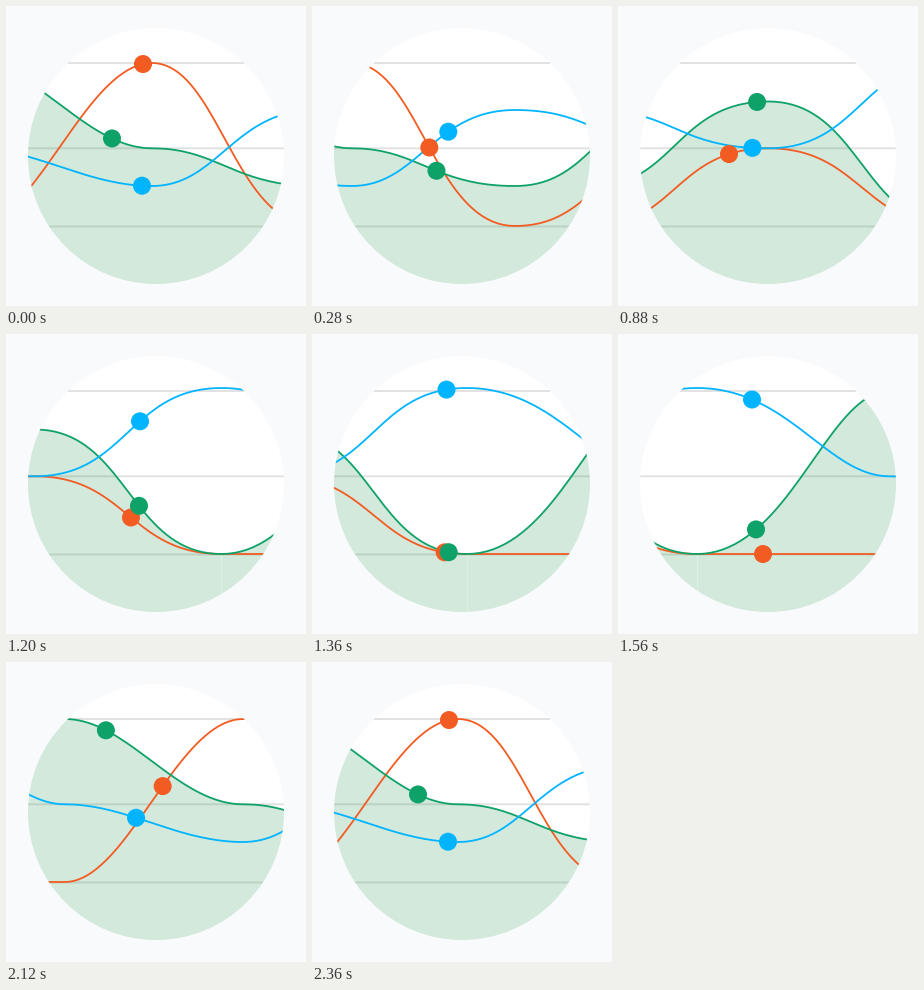
Write a matplotlib script that moves like this. It is 300 by 300 pixels and loops after 2.4 s.

```python
import numpy as np
import matplotlib.pyplot as plt
from matplotlib.animation import FuncAnimation
from matplotlib.patches import Circle

SIZE, DPI = 300, 100
FRAMES, INTERVAL = 60, 40
LAST = FRAMES - 1
PERIOD = 895
MID = 150
PX = 72 / DPI

ORANGE, GREEN, BLUE = "#f25c22", "#0fa268", "#00b4ff"
TOP, MIDDLE, LOW = 57, 142.3, 220

# Shared knots: place along the strip and length of the flat bezier handles
KNOTS = np.array([-4, 159, 334, 520.5, 713])
REACH = np.array([66, 81, 92, 92, 62])
SEAM = 3

LEVELS = {
    ORANGE: [TOP, LOW, MIDDLE, LOW, LOW],
    GREEN: [MIDDLE, 180, 95.5, LOW, TOP],
    BLUE: [180, 104, MIDDLE, 54, MIDDLE],
}

# The dots drift sideways between these beats while riding their curves
BEATS = np.array([0, 14, 30, 39, 47])
DRIFT = {
    ORANGE: [137, 105, 125, 145, 170],
    GREEN: [106, 141, 133, 138, 103],
    BLUE: [136, 135, 134, 134, 125],
}


def loop(values, span=0):
    """Repeat a periodic series once before and once after itself."""
    values = np.asarray(values)
    return np.concatenate([values - span, values, values + span])


def build_curve(levels):
    t = np.linspace(0, 1, 40, endpoint=False)[:, None]
    x0, x1 = KNOTS, np.append(KNOTS[1:], KNOTS[0] + PERIOD)
    y0, y1 = np.array(levels), np.roll(levels, -1)
    c0, c1 = x0 + REACH, x1 - np.roll(REACH, -1)
    s = 1 - t
    x = s**3 * x0 + 3 * s**2 * t * c0 + 3 * s * t**2 * c1 + t**3 * x1
    y = y0 + (y1 - y0) * t**2 * (3 - 2 * t)
    return loop(x.T.ravel(), PERIOD), loop(y.T.ravel())


def drift(color, i):
    """Smooth periodic path through the beats (Catmull-Rom)."""
    beats, xs = loop(BEATS, LAST), loop(DRIFT[color])
    k = np.searchsorted(beats, i, side="right") - 1
    width = beats[k + 1] - beats[k]
    p = (i - beats[k]) / width
    m0, m1 = [width * (xs[j + 1] - xs[j - 1]) / (beats[j + 1] - beats[j - 1])
              for j in (k, k + 1)]
    blend = p * p * (3 - 2 * p)
    return (xs[k] + (xs[k + 1] - xs[k]) * blend
            + m0 * p * (1 - p)**2 - m1 * p * p * (1 - p))


curves = {color: build_curve(levels) for color, levels in LEVELS.items()}

fig = plt.figure(figsize=(SIZE / DPI, SIZE / DPI), dpi=DPI, facecolor="#f8fafc")
ax = fig.add_axes([0, 0, 1, 1])
ax.set_xlim(0, SIZE)
ax.set_ylim(SIZE, 0)
ax.axis("off")

disc = Circle((MID, MID), 128, fc="white", ec="none", zorder=0)
ax.add_patch(disc)


def stroke(xs, ys, color, width, **style):
    line, = ax.plot(xs, ys, color=color, lw=width * PX, **style)
    line.set_clip_path(disc)
    return line


for y in (TOP, MIDDLE, LOW + .5):
    stroke([0, SIZE], [y, y], "#e2e2e2", 2, zorder=1, snap=False)

area, = ax.fill([0, 1, 1], [0, 0, 1], fc="#108a42", ec="none", alpha=.18, zorder=2)
area.set_clip_path(disc)
seam = stroke([], [], "white", 1, alpha=.3, zorder=2.5)

lines, dots = {}, {}
for n, color in enumerate(LEVELS):
    lines[color] = stroke([], [], color, 1.8, zorder=3 + n)
    dots[color] = ax.add_patch(Circle((0, 0), 9, fc=color, ec="none", zorder=6 + n))


def update(i):
    shift = MID - PERIOD * i / LAST
    for color, (x, y) in curves.items():
        lines[color].set_data(x + shift, y)
        cx = drift(color, i)
        dots[color].center = cx, np.interp(cx, x + shift, y)

    x, y = curves[GREEN]
    x = x + shift
    area.set_xy(np.column_stack([np.r_[x, x[-1], x[0]], np.r_[y, SIZE, SIZE]]))
    seam.set_data([KNOTS[SEAM] + shift] * 2, [LEVELS[GREEN][SEAM], SIZE])
    return [area, seam, *lines.values(), *dots.values()]


anim = FuncAnimation(fig, update, frames=FRAMES, interval=INTERVAL,
                     repeat=True, repeat_delay=0, blit=False)
plt.show()
```
